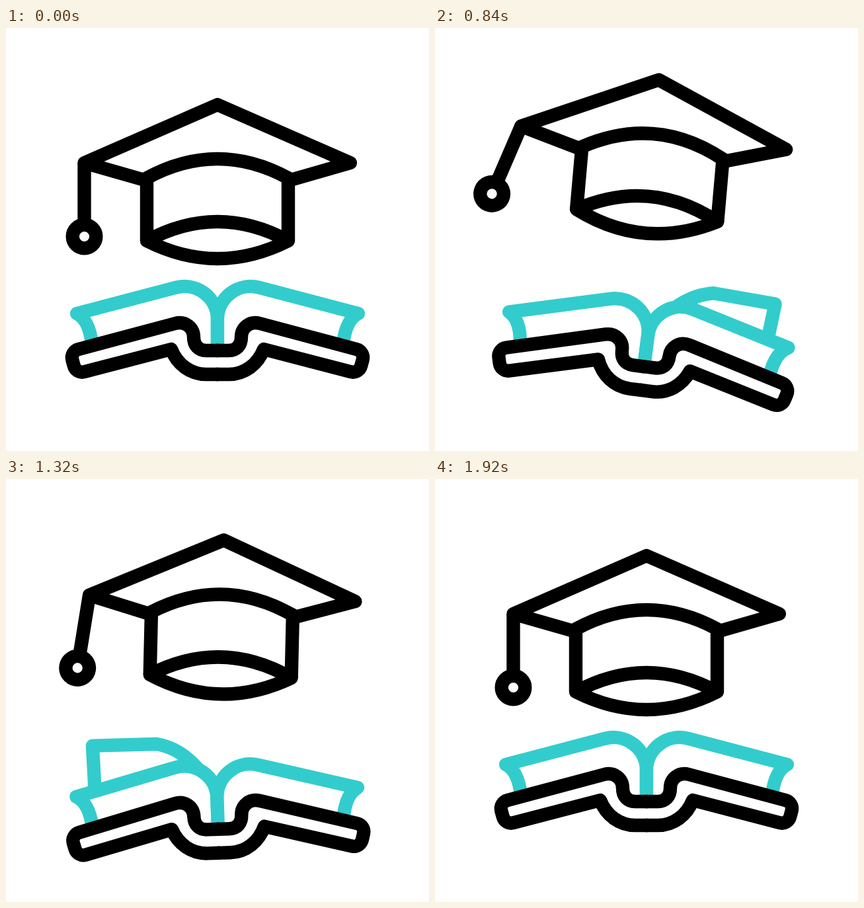
An HTML page with a canvas that plays this animation: 640 by 640 pixels, repeating every 2.2 s.

```html
<!DOCTYPE html>
<html lang="en">
<head>
<meta charset="utf-8">
<title>Cap and book</title>
<style>
  html, body { margin: 0; width: 100%; height: 100%; overflow: hidden; background: #fff; }
  canvas { display: block; }
</style>
</head>
<body>
<canvas id="stage" width="640" height="640"></canvas>
<script>
const ctx = document.getElementById('stage').getContext('2d');
const LOOP = 2200, STEP = 40, PAGE_TIME = 640;
const BLACK = '#000', TEAL = '#33cccc';

const capTop = new Path2D('M213 231 L118.5 204 L320 116 L521 204 L427 231');
const capBand = new Path2D('M213 322 V227 Q320 169 427 227 V322');
const capRim = new Path2D('M213 322 Q320 264 427 322 Q320 376 213 322 Z');
const tassel = new Path2D('M118.5 204 V297');
tassel.moveTo(136.3, 315.5);
tassel.arc(118.5, 315.5, 17.8, 0, Math.PI * 2);
const leaf = new Path2D('M130 478 C127 452 119 438 107 432 L257.1 392.7 A50 50 0 0 1 320 441 V482');
const cover = makeCover();

// Left half of the cover; the right half is its mirror image.
function makeCover() {
  const p = new Path2D('M322 488 H303 C291 488 284 480 284 468 C284 453 271 443 256 447');
  p.arcTo(97, 489.5, 106, 523.5, 13);
  p.arcTo(106, 523.5, 250, 486, 13);
  p.lineTo(250, 486);
  p.bezierCurveTo(259, 509, 279, 524, 303, 524);
  p.lineTo(322, 524);
  return p;
}

function ease(t, from, to) {
  const u = Math.min(1, Math.max(0, (t - from) / (to - from)));
  return u * u * (3 - 2 * u);
}

// Rises from 0 to 1 at the peak, then falls back to 0.
const hump = (t, from, peak, to) => ease(t, from, peak) - ease(t, peak, to);

function turn(x, y, degrees) {
  ctx.translate(x, y);
  ctx.rotate(degrees * Math.PI / 180);
  ctx.translate(-x, -y);
}

function line(path, color) {
  ctx.strokeStyle = color;
  ctx.stroke(path);
}

function bothSides(draw) {
  draw();
  ctx.save();
  ctx.translate(640, 0);
  ctx.scale(-1, 1);
  draw();
  ctx.restore();
}

// A page swings over the spine from right to left, bending on the way.
function drawPage(t) {
  if (t <= 0 || t >= PAGE_TIME) return;
  const angle = Math.PI * ease(t, 0, PAGE_TIME);
  const c = Math.cos(angle), s = Math.sin(angle);
  const swing = (x, y, lift, drag, spread, lean) => [
    320 + x * c + spread * s * c + lean * s ** 4,
    y - lift * s ** 1.2 + drag * s * c
  ];
  const p = new Path2D();
  p.moveTo(320, 441);
  p.quadraticCurveTo(...swing(13, 383, 30, 10, 58, 16), ...swing(63, 392, 78, 10, 82, 13));
  p.lineTo(...swing(213, 432, 172, 16, -6, -10));
  p.lineTo(...swing(191, 472, 47, 0, 30, -58));
  ctx.fill(p);
  line(p, TEAL);
}

function drawBook(t) {
  const drop = 57 * hump(t, 608, 1120, 1712);
  const tilt = 7.5 * hump(t, 480, 800, 1280)
    - 2 * hump(t, 800, 1280, 1600)
    + 1.1 * hump(t, 1280, 1600, 1880);
  ctx.save();
  ctx.translate(0, drop);
  turn(320, 458, tilt);
  drawPage(t - 680);
  drawPage(t - 840);
  bothSides(() => { ctx.fill(leaf); line(leaf, TEAL); });
  bothSides(() => line(cover, BLACK));
  ctx.restore();
}

function drawCap(t) {
  const dip = hump(t, 200, 560, 1040);
  const leap = hump(t, 560, 1040, 1560);
  const rebound = hump(t, 1040, 1560, 1880);
  ctx.save();
  ctx.translate(18.4 * leap - 1.2 * (dip + rebound), 26 * dip - 76.5 * leap + 18.5 * rebound);
  turn(319.5, 204, -4.4 * dip + 10.7 * leap - 6.1 * rebound);
  [capTop, capBand, capRim].forEach(p => line(p, BLACK));
  turn(118.5, 204, -9 * hump(t, 310, 560, 1040) + 34.8 * leap - 13.5 * rebound);
  line(tassel, BLACK);
  ctx.restore();
}

function draw(t) {
  ctx.fillStyle = '#fff';
  ctx.fillRect(0, 0, 640, 640);
  ctx.lineWidth = 20.4;
  ctx.lineJoin = 'round';
  drawBook(t);
  drawCap(t);
}

const began = performance.now();
function tick() {
  const t = (performance.now() - began) % LOOP;
  draw(Math.floor(t / STEP) * STEP);
  requestAnimationFrame(tick);
}
tick();
</script>
</body>
</html>
```
